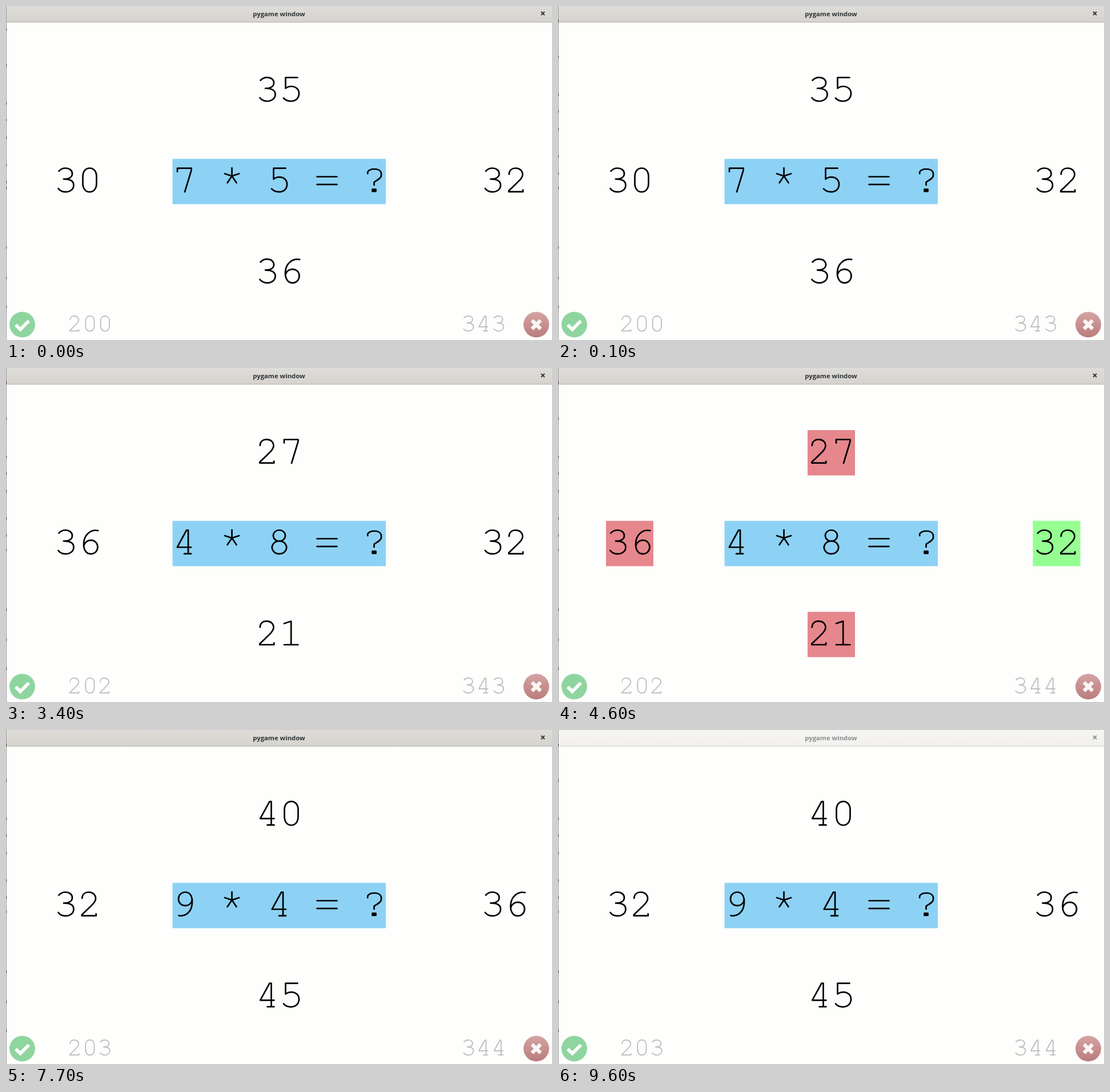
An HTML page with a canvas for the animation above (9.8 s loop, 956x586 px).

```html
<!DOCTYPE html>
<html lang="en">
<meta charset="utf-8">
<title>pygame window</title>
<style>
  html, body { margin: 0; overflow: hidden; background: #fefefd; }
  canvas { display: block; }
</style>
<canvas id="stage" width="956" height="586" role="img"></canvas>
<script>
const canvas = document.getElementById('stage');
const ctx = canvas.getContext('2d');
const LOOP = 9800, ADVANCE = 41.5, CELL_HEIGHT = 79.5;

// Thin typewriter characters as single strokes in a 41.5 x 79.5 cell
const glyphs = {
  0: 'M21 16.3C29 16.3 33 23 33 31V43C33 51 29 58 21 58S9 51 9 43V31C9 23 13 16.3 21 16.3Z',
  1: 'M8.5 20.5L20.7 16.5V57.7M8.5 57.7H33',
  2: 'M7.8 27C8 20 13 16.3 19.5 16.3C26 16.3 31.5 20.5 31.5 27.5C31.5 33 28 36.5 7.3 56V57.7H32.2V54.5',
  3: 'M8.5 21.5C12 17.5 16 16.3 20 16.3C27 16.3 32 20 32 26C32 31.5 27 35.5 17 35.5C29 35.5 34.5 39.5 34.5 46C34.5 53.5 28 58 20.5 58C15 58 10.5 56 7.5 52',
  4: 'M27.5 57.7V16.5H24.5L8.2 46.3H32.5M20.5 57.7H32.5',
  5: 'M32 16.5H11V35.5C14 33 17.5 32 21 32C29 32 34.5 37 34.5 44.5C34.5 52.5 29 58 20.5 58C15 58 10.5 56 7.5 52.5',
  6: 'M35.8 17C23 14.5 10.5 24 10.5 41C10.5 52 16 58 23 58C30 58 35 52.5 35 46C35 39 30 34 23.5 34C17 34 12 38 10.7 44',
  7: 'M8.5 22.5V16.5H33V20L21.5 58',
  8: 'M21 16.3A10.5 9.6 0 1 1 20.9 16.3ZM21 35.5A12.6 11.2 0 1 1 20.9 35.5Z',
  9: 'M11 57.5C24 59.5 34.5 50 34.5 33C34.5 22 29.5 16.3 22.5 16.3C15.5 16.3 10.5 21.5 10.5 28C10.5 35 15.5 40 22 40C28.5 40 33 36 34.3 30',
  '*': 'M21 16V30L8.5 26M21 30L33.5 26M21 30L13 42M21 30L29 42',
  '=': 'M4 31.3H39M4 45H39',
  '?': 'M9.7 26V23C12 19 16.5 17.8 21.5 17.8C29 17.8 33.7 21.5 33.7 27.5C33.7 34 28 36 21 41V46M18 53.5H24V57H18ZM18 55.2H24'
};
for (const ch in glyphs) glyphs[ch] = new Path2D(glyphs[ch]);

// Answers are ordered top, left, right, bottom
const places = [[478.5, 109], [125.5, 268.2], [873, 268.2], [478.5, 427.8]];
const rounds = [
  { start: 0, question: '7 * 5 = ?', answers: [35, 30, 32, 36], right: 200, wrong: 343 },
  { start: 2100, question: '10 * 5 = ?', answers: [60, 50, 54, 40], right: 201, wrong: 343 },
  { start: 3400, question: '4 * 8 = ?', answers: [27, 36, 32, 21], right: 202, wrong: 343 },
  { start: 4600, question: '4 * 8 = ?', answers: [27, 36, 32, 21], right: 202, wrong: 344, solution: 32 },
  { start: 6700, question: '1 * 7 = ?', answers: [16, 7, 6, 12], right: 202, wrong: 344 },
  { start: 7700, question: '9 * 4 = ?', answers: [40, 32, 36, 45], right: 203, wrong: 344 }
];

function rect(x, y, w, h, fill) {
  ctx.fillStyle = fill;
  ctx.fillRect(x, y, w, h);
}

function line(path, color, width) {
  ctx.strokeStyle = color;
  ctx.lineWidth = width;
  ctx.stroke(new Path2D(path));
}

function write(text, x, y, scale, color) {
  ctx.save();
  ctx.translate(x, y);
  ctx.scale(scale, scale);
  ctx.strokeStyle = color;
  ctx.lineWidth = 2.7;
  ctx.lineCap = ctx.lineJoin = 'round';
  for (const ch of String(text)) {
    if (glyphs[ch]) ctx.stroke(glyphs[ch]);
    ctx.translate(ADVANCE, 0);
  }
  ctx.restore();
}

function label(text, [cx, y], fill) {
  const width = String(text).length * ADVANCE;
  if (fill) rect(cx - width / 2, y, width, CELL_HEIGHT, fill);
  write(text, cx - width / 2, y, 1, '#000');
}

function gradient(y0, y1, from, to) {
  const g = ctx.createLinearGradient(0, y0, 0, y1);
  g.addColorStop(0, from);
  g.addColorStop(1, to);
  return g;
}

function badge(x, fill, mark, color, width) {
  ctx.fillStyle = fill;
  ctx.beginPath();
  ctx.arc(x, 559, 22.5, 0, 2 * Math.PI);
  ctx.fill();
  line(mark, color, width);
}

function titleBar(active) {
  const ink = active ? '#2e3436' : '#8b8e8f';
  rect(0, 0, 956, 28, active ? gradient(0, 28, '#dfddd9', '#d6d3ce') : gradient(0, 28, '#f6f5f3', '#f2f1ee'));
  rect(0, 28, 956, 1, active ? '#b5b3ac' : '#d3d2cd');
  ctx.fillStyle = ink;
  ctx.font = 'bold 11.3px "Open Sans", "Noto Sans", sans-serif';
  ctx.textAlign = 'center';
  ctx.fillText('pygame window', 478, 18);
  line('M937 10L943 16M943 10L937 16', ink, 1.8);
}

function leftEdge(shift) {
  rect(0, 0, 1, 586, '#979797');
  for (const y of [24, 87, 154, 183, 214, 262, 292]) rect(0, y + shift, 1, 4, '#222');
  for (const y of [317, 422, 475, 526]) rect(0, y, 1, 4, '#222');
}

function draw(t) {
  const round = rounds.findLast(r => r.start <= t);
  rect(0, 0, 956, 586, '#fefefd');
  titleBar(t < 9600);
  leftEdge(t < 100 ? 15 : 0);
  label(round.question, [478.3, 268.2], '#8dd2f4');
  round.answers.forEach((answer, i) => {
    const fill = round.solution && (answer === round.solution ? '#96ff92' : '#e6878d');
    label(answer, places[i], fill);
  });
  write(round.right, 107.2, 533.5, 0.636, '#b9b9b9');
  write(round.wrong, 796.5, 533.5, 0.636, '#b9b9b9');
  badge(28.5, '#8fd5a0', 'M17 559.5L25 567.5L40 552.5', '#fcfefc', 6);
  badge(928.5, gradient(537, 582, '#d5a3a3', '#b97c7c'), 'M921 551.5L936 566.5M936 551.5L921 566.5', '#faf5f5', 6.5);
  canvas.setAttribute('aria-label', round.question);
}

function tick() {
  draw(performance.now() % LOOP);
  requestAnimationFrame(tick);
}
tick();
</script>
</html>
```
